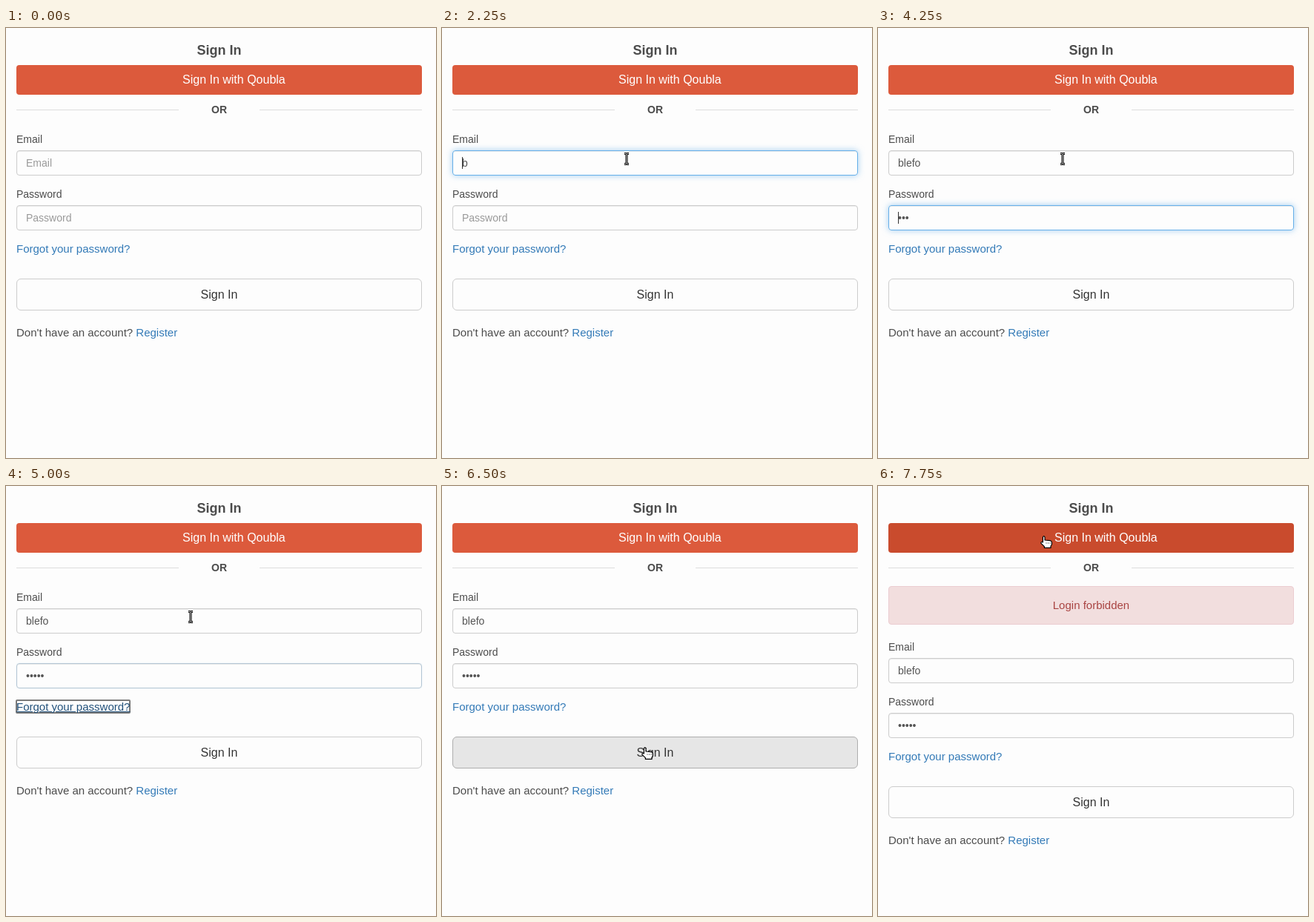
Animation of 580x580 px, one loop 8 s. Source, as an HTML page:

```html
<!DOCTYPE html>
<html lang="en">
<head>
<meta charset="utf-8">
<title>Sign in form</title>
<style>
  html, body { margin: 0; width: 100%; height: 100%; overflow: hidden; background: #fdfdfd; }
  body { position: relative; font: 14px/20px "Liberation Sans", Arial, sans-serif; color: #4c4c4c; }
  #stage { position: absolute; left: 0; top: 0; width: 580px; height: 580px; overflow: hidden; background: #fdfdfd; }
  #stage div { position: absolute; box-sizing: border-box; white-space: pre; }
  .row { left: 14px; width: 547px; }
  .mid { text-align: center; }
  .big { font-size: 16px; line-height: 21px; }
  .text { font-size: 15px; line-height: 21px; }
  .blue { color: #337ab7; }
  .rule { top: 110px; width: 219px; height: 1px; background: #ddd; }
  .field { height: 34px; padding: 6px 12px; border: 1px solid #ccc; border-radius: 4px; color: #555; }
  .field i { position: absolute; top: 8px; width: 1px; height: 16px; background: #333; }
  .field em { font-style: normal; color: #999; }
  #social { top: 50px; height: 40px; border-radius: 4px; color: #fff; }
  #alert { top: 135px; height: 52px; padding-top: 14px; border: 1px solid #ebccd1; border-radius: 4px; background: #f2dede; color: #a94442; }
  #form { left: 0; width: 580px; height: 400px; }
  #submit { top: 338px; height: 43px; padding-top: 10px; border: 1px solid #ccc; border-radius: 6px; color: #333; }
  #ring { left: 13px; top: 288px; width: 155px; height: 19px; border: 2px solid #7a7a7a; border-radius: 2px; }
  svg { position: absolute; left: 0; top: 0; overflow: visible; }
  svg g { fill: #fff; stroke: #000; stroke-width: 1.2; stroke-linejoin: round; }
</style>
</head>
<body>
<div id="stage">
  <div class="row mid" style="top:20px;font-size:18px;font-weight:bold">Sign In</div>
  <div class="row big" id="social"><div style="left:224px;top:9px">Sign In with Qoubla</div></div>
  <div class="rule" style="left:14px"></div>
  <div class="rule" style="left:342px"></div>
  <div class="row mid" style="top:100px;font-weight:bold">OR</div>
  <div class="row mid text" id="alert">Login forbidden</div>
  <div id="form">
    <div class="row" style="top:140px">Email</div>
    <div class="row field" id="email" style="top:165px"><span></span><i></i><em>Email</em></div>
    <div class="row" style="top:214px">Password</div>
    <div class="row field" id="password" style="top:239px"><span></span><i></i><em>Password</em></div>
    <div id="ring"></div>
    <div class="text blue" id="forgot" style="left:14px;top:287px">Forgot your password?</div>
    <div class="row mid big" id="submit">Sign In</div>
    <div class="text" style="left:14px;top:400px">Don't have an account? <span class="blue">Register</span></div>
  </div>
  <svg width="580" height="580">
    <g id="arrow"><path d="M.6 .8V17L4.4 13.6L7.2 20L9.8 18.9L7.1 12.6H12.2Z"/></g>
    <g id="beam">
      <path d="M1 1.5H3.2L4 2.3L4.8 1.5H7M4 2.3V14.7M1 15.5H3.2L4 14.7L4.8 15.5H7" fill="none" stroke-width="3"/>
      <path d="M1.2 1.5H3.2L4 2.3L4.8 1.5H6.8M4 2.3V14.7M1.2 15.5H3.2L4 14.7L4.8 15.5H6.8" fill="none" stroke="#fff" stroke-width=".8"/>
    </g>
    <g id="hand">
      <path d="M3.4 9V2Q4.7 -.6 6 2V6L13 6.6Q15.3 7 15.4 9V12L14 14V16.4H5.4V14.6L1 10.4Q.2 7.6 3.4 9Z"/>
      <path d="M7.5 10h1M10 10h1M12.5 10h1"/>
    </g>
  </svg>
</div>
<script>
const LOOP = 8000, STEP = 250;
const USER = "blefo";
const $ = id => document.getElementById(id);

// Each track is a list of [start time, value]; values hold until the next one.
const tracks = {
  emailFocus: [[0, 0], [1000, .6], [1250, 1], [3250, .4], [3500, 0]],
  emailCaret: [[0, 0], [1000, 1], [1500, 0], [2000, 1], [3250, 0]],
  emailChars: [[0, 0], [2250, 1], [2500, 2], [2750, 3], [3000, 5]],
  passFocus: [[0, 0], [3250, .7], [3500, 1], [5000, .25], [5250, 0]],
  passCaret: [[0, 0], [3250, 1], [5000, 0]],
  passChars: [[0, 0], [3750, 1], [4000, 2], [4250, 3], [4500, 5]],
  linkFocus: [[0, 0], [5000, 1], [6000, 0]],
  submitHover: [[0, 0], [6250, 1], [7500, 0]],
  socialHover: [[0, 0], [7750, 1]],
  failed: [[0, 0], [7000, 1]],
  pointer: [
    [0, null], [500, ["arrow", 250, 216]], [750, ["beam", 245, 168]],
    [5500, ["arrow", 252, 212]], [5750, ["beam", 257, 252]], [6000, ["arrow", 268, 304]],
    [6250, ["hand", 268, 342]], [6500, ["hand", 269, 352]], [7000, ["arrow", 273, 352]],
    [7500, ["arrow", 243, 196]], [7750, ["hand", 219, 67]]
  ]
};

const at = (name, t) => tracks[name].filter(k => k[0] <= t).pop()[1];
const mix = (a, b, p) => "rgb(" + a.map((v, i) => Math.round(v + (b[i] - v) * p)) + ")";

function drawField(id, value, focus, caret) {
  const box = $(id), [text, bar, hint] = box.children;
  text.textContent = value;
  bar.style.display = caret ? "block" : "none";
  hint.style.display = value ? "none" : "inline";
  box.style.borderColor = mix([204, 204, 204], [102, 175, 233], focus);
  box.style.boxShadow = "inset 0 1px 1px rgba(0,0,0,.075), 0 0 " +
    8 * focus + "px rgba(102,175,233," + .6 * focus + ")";
}

function draw(t) {
  drawField("email", USER.slice(0, at("emailChars", t)), at("emailFocus", t), at("emailCaret", t));
  drawField("password", "•".repeat(at("passChars", t)), at("passFocus", t), at("passCaret", t));

  const link = at("linkFocus", t);
  $("ring").style.display = link ? "block" : "none";
  $("forgot").style.color = link ? "#23527c" : "";
  $("forgot").style.textDecoration = link ? "underline" : "none";

  const hover = at("submitHover", t);
  $("submit").style.background = hover ? "#e6e6e6" : "#fdfdfd";
  $("submit").style.borderColor = hover ? "#adadad" : "#ccc";
  $("social").style.background = at("socialHover", t) ? "#c94b2d" : "#dc5a3c";

  const failed = at("failed", t);
  $("alert").style.display = failed ? "block" : "none";
  $("form").style.top = failed ? "67px" : "0";

  const pointer = at("pointer", t);
  for (const id of ["arrow", "beam", "hand"]) {
    const shown = pointer && pointer[0] === id;
    $(id).style.display = shown ? "inline" : "none";
    if (shown) $(id).setAttribute("transform", `translate(${pointer[1]} ${pointer[2]})`);
  }
}

const start = performance.now();
function tick() {
  const t = (performance.now() - start) % LOOP;
  draw(Math.floor(t / STEP) * STEP);
  requestAnimationFrame(tick);
}
tick();
</script>
</body>
</html>
```
